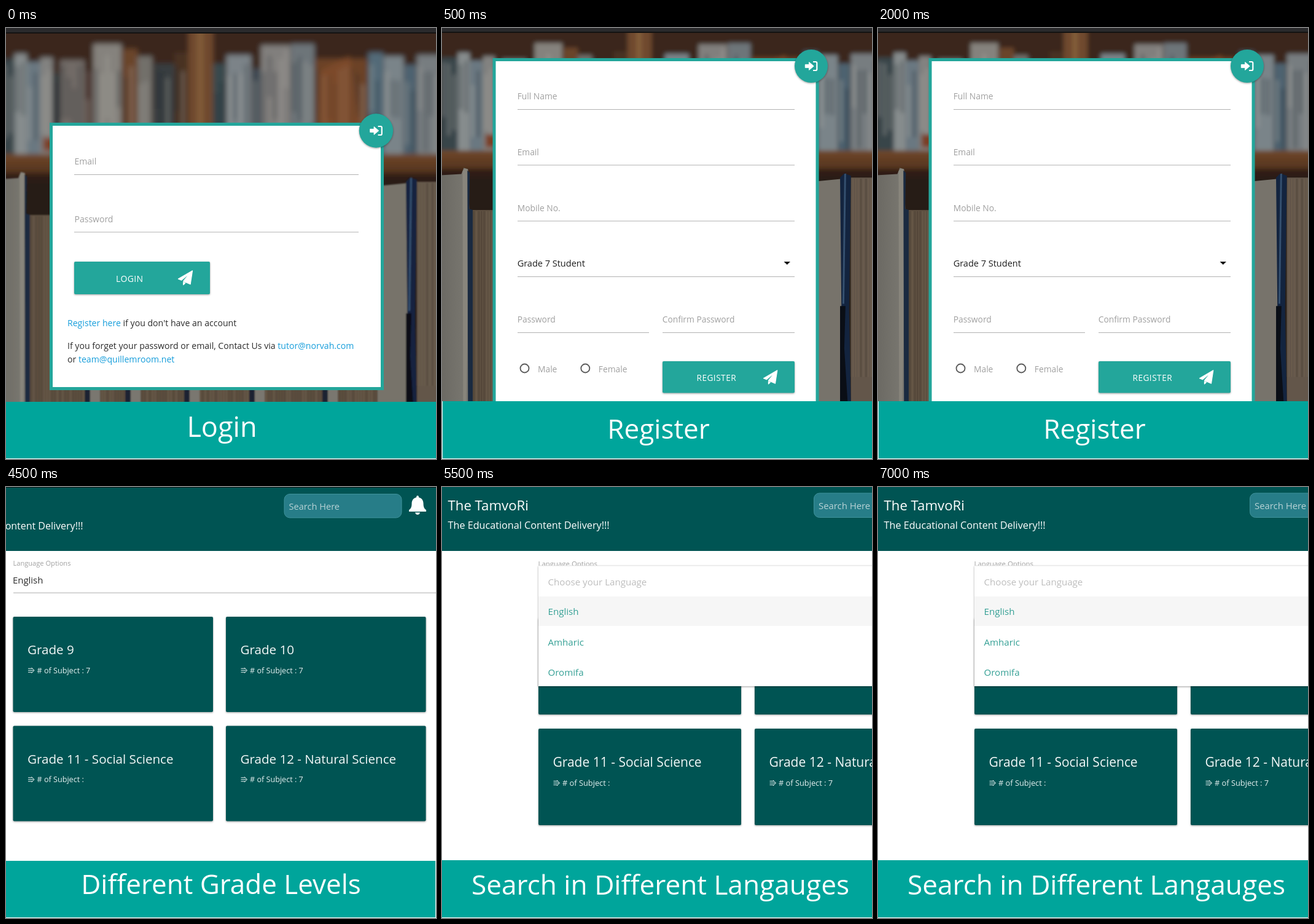
An HTML page that plays this animation: 700x701 px, repeating every 8 s.

```html
<!DOCTYPE html>
<html lang="en">
<head>
<meta charset="utf-8">
<title>Learning platform tour</title>
<style>
  html, body { margin: 0; width: 100%; height: 100%; overflow: hidden; background: #fff; }
  svg { display: block; }
  text { font-family: "Open Sans", "Noto Sans", sans-serif; }
  .raised { filter: drop-shadow(0 1.5px 1.5px rgba(0, 0, 0, .38)); }
</style>
</head>
<body>
<svg id="stage" width="700" height="701" viewBox="0 0 700 701"></svg>
<script>
const TEAL = '#23a69b', BANNER = '#00a59b', DEEP = '#005453';
const GREY = '#a0a0a0', LINK = '#159ddb', INK = '#2b2b2b';
const LOOP = 8000;

const rect = (x, y, w, h, fill, more = '') =>
  `<rect x="${x}" y="${y}" width="${w}" height="${h}" fill="${fill}" ${more}/>`;
const text = (x, y, size, fill, str, more = '') =>
  `<text x="${x}" y="${y}" font-size="${size}" fill="${fill}" ${more}>${str}</text>`;
const path = (d, more) => `<path d="${d}" ${more}/>`;
const at = (x, y, body, scale = 1) => `<g transform="translate(${x} ${y}) scale(${scale})">${body}</g>`;
const link = str => `<tspan fill="${LINK}">${str}</tspan>`;
const rule = (x, y, w, fill = '#b2b2b2') => rect(x, y, w, 1, fill);

function banner(y, center, baseline, size, str, x = 0, w = 700) {
  return rect(0, y, 700, 701 - y, '#fff') + rect(x, y, w, 700 - y, BANNER) +
    text(center, baseline, size, '#fff', str, 'text-anchor="middle"');
}

// Icons
const plane = path('M24 .8 1 14.1l5 2.2L20.6 4 9.2 18l11.4 4.800zM9.2 19.5v4.200l3-2.800z',
  'fill="#fff" stroke="#fff" stroke-width="1.2" stroke-linejoin="round"');
const enter = path('M.8 6.4h6.3V2.6l7.6 6.4-7.6 6.4v-3.8H.8z', 'fill="#fff" stroke="#fff" stroke-linejoin="round"') +
  path('M13.6 2h4.2q2 0 2 2v10q0 2-2 2h-4.2', 'fill="none" stroke="#fff" stroke-width="2.2"');
const bell = path('M14 0q2 0 2 3c5 1 7.5 5 7.5 10 0 6 1.5 8 4.5 10.5v2.5H0v-2.5C3 21 4.5 19 4.5 13 4.5 8 7 4 12 3q0-3 2-3zM10 27.5h8q-1 3.5-4 3.5t-4-3.5z', 'fill="#fff"');
const arrow = path('M0-3h7M0 0h9M0 3h7M5.5-4.5 10 0 5.5 4.5', 'fill="none" stroke="#e6f0f0" stroke-width="1"');

const badge = (x, y, r) =>
  `<circle class="raised" cx="${x}" cy="${y}" r="${r}" fill="${TEAL}"/>` + at(x - 10.5, y - 9, enter);
const button = (x, y, w, h) => rect(x, y, w, h, TEAL, 'rx="2" class="raised"');

// Blurred library backdrop
function library() {
  let seed = 11;
  const rnd = () => (seed = seed * 16807 % 2147483647) / 2147483647;
  const rows = [
    [-15, 30, 50, '#38444a'], [14, 20, 42, '#868c8d'], [34, 22, 55, '#6a7881'], [56, 20, 48, '#828280'],
    [76, 12, 74, '#2c3134'], [88, 40, 52, '#716a66'], [128, 14, 70, '#4d3a34'], [142, 46, 26, '#85827d'],
    [190, 24, 34, '#6b452c'], [214, 24, 46, '#726f6b'], [240, 34, 58, '#373e40'], [274, 24, 40, '#493223'],
    [337, 20, 58, '#39494d'], [359, 40, 44, '#7c8388'], [401, 14, 66, '#3d4a53'], [415, 48, 28, '#817f7d'],
    [464, 38, 26, '#6d7479'], [504, 84, 50, '#6c4327'], [590, 24, 40, '#536a78'], [615, 32, 46, '#7a8489'],
    [648, 20, 60, '#4d626f'], [669, 50, 44, '#777d80']
  ];
  let books = '';
  for (const [x, w, top, fill] of rows) {
    books += rect(x, top, w, 206 - top, fill);
    for (let i = x + 3; i < x + w - 4; i += 9)
      books += rect(i, top + 8 + rnd() * 40, 4, 60 + rnd() * 70, rnd() < .5 ? '#b0aea7' : '#1c252c', 'opacity=".42"');
  }
  const soft = rect(-40, -20, 780, 330, '#3b271a') + books +
    path('M510 70 560 45 580 190 508 196z', 'fill="#87512a" opacity=".55"') +
    rect(60, 178, 22, 22, '#7a3f27') +
    rect(297, -10, 40, 222, '#6f4a2d') + rect(312, -10, 8, 222, '#85603b') +
    rect(-40, 205, 780, 33, 'url(#shelf)') +
    rect(-40, 236, 780, 14, '#2f1d13') + rect(-40, 250, 780, 380, '#261b15');

  let pages = rect(36, 304, 625, 320, '#5d4f40') + rect(669, 250, 60, 380, '#63564a');
  for (let x = 40; x < 720; x += 4.3)
    pages += rect(x, x > 660 ? 252 : 306, 1.4, 330, rnd() < .5 ? '#736453' : '#4a3e32', 'opacity=".6"');
  for (const x of [128, 194, 290, 396, 515])
    pages += rect(x, 400, 9, 230, '#1c2431') + rect(x + 9, 400, 16, 230, '#7a776f');

  const front = pages +
    path('M-30 247 20 244 24 234 31 236 34 630H-30z', 'fill="url(#cover)"') +
    path('M22 240q3-8 9-3l2 64-5 329H23z', 'fill="#88857c"') +
    path('M30 238 34 242 33 302 39 304V630H31z', 'fill="#1a2a40"') +
    path('M605 257 655 252 657 630H605z', 'fill="#77736b"') +
    path('M651 250 658 243 669 247 666 470 669 630H655z', 'fill="#13243f"') +
    path('M651 464h9l-2 70 6 96h-13z', 'fill="#0a0e16"') +
    path('M658 244 661 243 658 460 655 460z', 'fill="#35506f"');
  return `<g id="library"><g filter="url(#blur)">${soft}</g><g filter="url(#haze)">${front}</g></g>`;
}

const defs = `<defs>
  <filter id="blur" x="-5%" y="-5%" width="110%" height="110%"><feGaussianBlur stdDeviation="4"/></filter>
  <filter id="haze" x="-5%" y="-5%" width="110%" height="110%"><feGaussianBlur stdDeviation=".8"/></filter>
  <linearGradient id="cover"><stop offset="0" stop-color="#66645e"/><stop offset="1" stop-color="#7b7972"/></linearGradient>
  <linearGradient id="shelf" x2="0" y2="1"><stop offset="0" stop-color="#704729"/><stop offset="1" stop-color="#51321d"/></linearGradient>
  ${library()}
</defs>`;

const topBar = h => rect(0, 0, 700, h, '#2a2a2c') + rect(0, h - 1, 700, 2, '#141312');

function login() {
  const label = (y, str) => text(111.5, y, 14, GREY, str) + rule(111, y + 16, 463);
  return '<use href="#library"/>' + topBar(8) +
    rect(73.5, 156.5, 539, 430, '#fff', `stroke="${TEAL}" stroke-width="5"`) +
    badge(602.5, 167, 27.7) +
    label(222, 'Email') + label(315.5, 'Password') +
    button(111, 380, 221, 53) +
    text(179, 412.5, 14, '#fff', 'LOGIN', 'letter-spacing=".4"') + at(279.5, 394, plane) +
    text(100, 484.5, 14.1, INK, link('Register here') + " if you don't have an account") +
    text(100, 521.5, 14.1, INK, 'If you forget your password or email, Contact Us via ' + link('tutor@norvah.com')) +
    text(100, 543.5, 14.1, INK, 'or ' + link('team@quillemroom.net')) +
    banner(608, 351.5, 665, 45, 'Login');
}

function register() {
  const field = (x, y, w, str, fill = GREY, size = 13.8) =>
    text(x - .3, y, size, fill, str) + rule(x, y + 16, w);
  const radio = (x, str) =>
    `<circle cx="${x}" cy="553.5" r="7" fill="none" stroke="#5c5c5c" stroke-width="1.9"/>` +
    text(x + 21.5, 559.5, 13.8, GREY, str);
  return at(12, -1, '<use href="#library"/>', .977) + topBar(7) +
    rect(85, 51.5, 526, 600, '#fff', `stroke="${TEAL}" stroke-width="5"`) +
    badge(601, 62, 27) +
    field(123, 116, 451, 'Full Name') + field(123, 206.5, 451, 'Email') +
    field(123, 297.5, 451, 'Mobile No.') + field(123, 388, 451, 'Grade 7 Student', '#1d1d1d', 14.5) +
    path('M556.5 380h10.5l-5.25 5z', 'fill="#111"') +
    field(123, 479, 214, 'Password') + field(359, 479, 215, 'Confirm Password') +
    radio(134.5, 'Male') + radio(233.3, 'Female') +
    button(359, 542, 215, 51.5) +
    text(414.5, 573.5, 13.6, '#fff', 'REGISTER', 'letter-spacing=".5"') + at(522.5, 556, plane, .97) +
    banner(607, 352.5, 668, 44, 'Register', 1, 699);
}

function gradeCard(x, y, w, h, size, small, name, count) {
  return rect(x, y, w, h, DEEP, 'rx="2" class="raised"') +
    text(x + 23.5, y + h * .395, size, '#f2f7f7', name) +
    at(x + 24.5, y + h * .563, arrow) +
    text(x + 39, y + h * .591, small, '#e6f0f0', '# of Subject : ' + count);
}

const searchBox = (x, y, w, h, size) =>
  rect(x, y, w, h, '#277d88', 'rx="9" stroke="#3f929b" stroke-width="1"') +
  text(x + 7.5, y + 25.5, size, '#b9d3d6', 'Search Here');

function grades() {
  const card = (x, y, name, count) => gradeCard(x, y, 325.5, 155, 20.6, 12.6, name, count);
  return rect(0, 0, 700, 701, '#fff') + rect(0, 0, 700, 104, DEEP) + rect(0, 0, 700, 1, '#061414') +
    text(125.5, 69, 16, '#fff', 'The Educational Content Delivery!!!', 'text-anchor="end"') +
    searchBox(453, 11.5, 191, 38.5, 14.6) + at(656, 14, bell) +
    text(11.5, 128, 11.1, GREY, 'Language Options') +
    text(11, 156.5, 14.9, INK, 'English') + rect(12, 171.5, 688, 1.5, '#c8c8c8') +
    card(11.5, 211, 'Grade 9', 7) + card(358, 211, 'Grade 10', 7) +
    card(11.5, 388.5, 'Grade 11 - Social Science', '') + card(358, 388.5, 'Grade 12 - Natural Science', 7) +
    banner(608, 350, 662, 44, 'Different Grade Levels', 0, 699);
}

function languages() {
  const card = (x, y, name, count) => gradeCard(x, y, 330, 157, 21, 12.8, name, count);
  const option = (y, str, fill = '#35a095') => text(172.5, y, 15.1, fill, str);
  return rect(0, 0, 700, 701, '#fff') + rect(0, 0, 700, 104, DEEP) +
    text(9.5, 38, 22.2, '#fff', 'The TamvoRi') +
    text(9.5, 68, 16.2, '#fff', 'The Educational Content Delivery!!!') +
    searchBox(605.5, 10, 194, 39.5, 14.9) +
    text(156.5, 128.5, 11.4, GREY, 'Language Options') +
    card(157, 213, 'Grade 9', 7) + card(509, 213, 'Grade 10', 7) +
    card(157, 393, 'Grade 11 - Social Science', '') + card(509, 393, 'Grade 12 - Natural Science', 7) +
    rect(157, 128, 560, 196, '#fff', 'class="raised"') + rect(157, 127.5, 560, 1, '#e4e4e4') +
    rect(157, 178, 560, 48, '#f6f6f6') +
    option(160, 'Choose your Language', '#bdbdbd') + option(208, 'English') +
    option(258, 'Amharic') + option(306.5, 'Oromifa') +
    banner(607, 355.5, 663, 44.2, 'Search in Different Langauges');
}

const scenes = [[0, login], [500, register], [3000, grades], [5500, languages]];
const stage = document.getElementById('stage');
stage.innerHTML = defs + scenes.map(([, draw]) => `<g class="scene">${draw()}</g>`).join('');
const nodes = stage.querySelectorAll('.scene');

// Hard cuts: only the latest scene already started is visible.
function show() {
  const t = performance.now() % LOOP;
  const current = scenes.filter(([start]) => start <= t).length - 1;
  nodes.forEach((node, i) => { node.style.display = i === current ? '' : 'none'; });
  requestAnimationFrame(show);
}
show();
</script>
</body>
</html>
```
